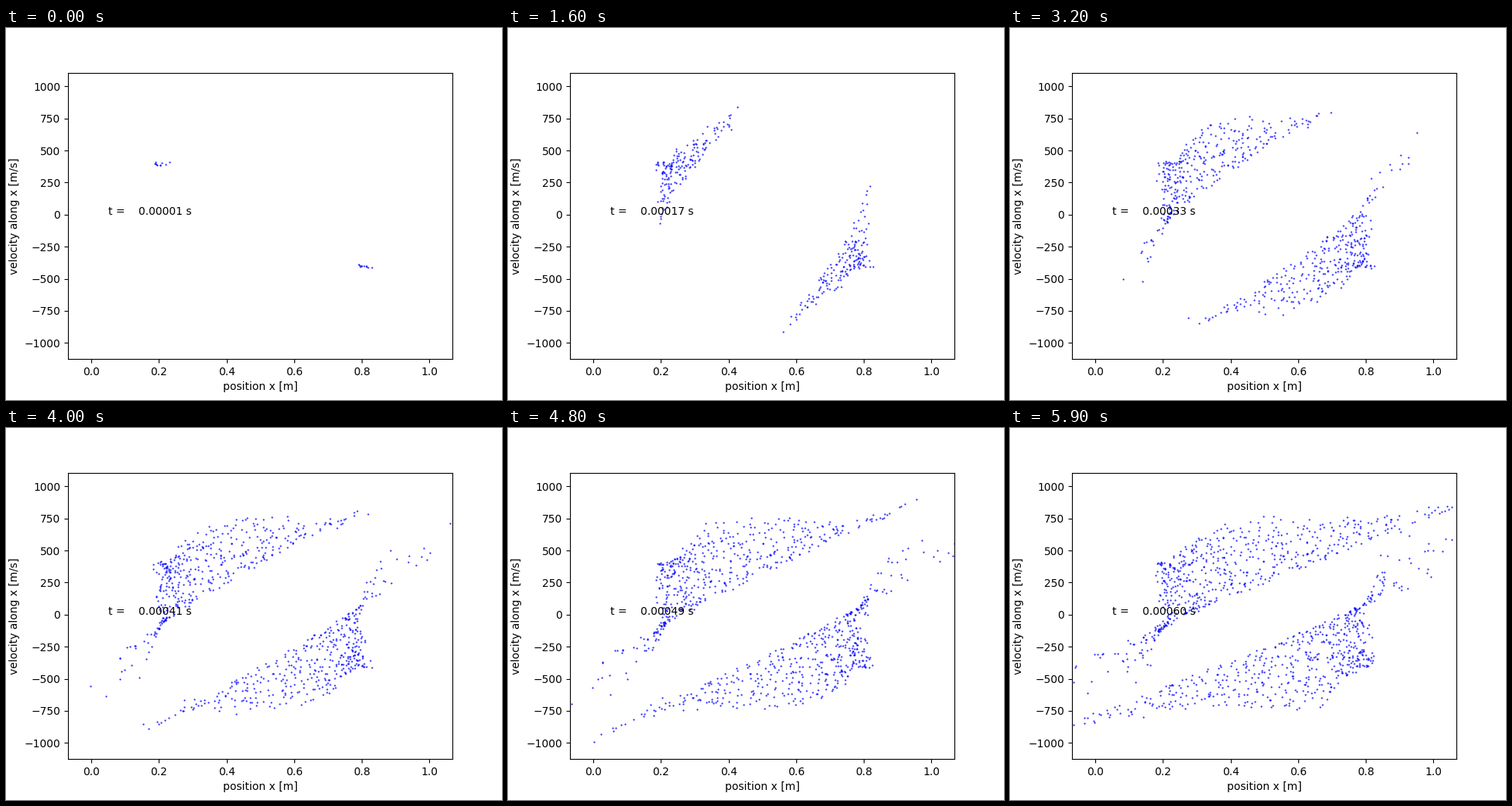
Write a matplotlib script that moves like this. It is 640 px wide and 480 px high and loops after 6 s.

```python
import numpy as np
import matplotlib.pyplot as plt
from matplotlib.animation import FuncAnimation

FRAMES = 60
BATCH = 10           # particles injected per beam and frame
STEP = 2e-5          # distance moved per frame and unit of speed
SPEED = 400
SOURCE = .2          # the second source mirrors this one
WIDTH = .014         # spread of a new batch in every direction
HEAT = 10            # spread of its speed
SOFT = .01           # softens the force between close pairs
MEET, MEET_SPEED = 25, 650   # frame and speed of the fronts when they meet


def new_batch(rng):
    """Two clouds of particles that fly towards each other along x."""
    pos = rng.normal(0, WIDTH, (2 * BATCH, 3))
    vel = rng.normal(0, HEAT, (2 * BATCH, 3))
    side = np.repeat([-1, 1], BATCH)
    pos[:, 0] += .5 + side * (.5 - SOURCE)
    vel[:, 0] -= side * SPEED
    return pos, vel


def repulsion(pos):
    """Sum of softened inverse-square forces on every particle."""
    p = pos - pos.mean(axis=0)
    square = (p ** 2).sum(axis=1)
    dist2 = square[:, None] + square - 2 * p @ p.T + SOFT ** 2
    weight = 1 / (dist2 * np.sqrt(dist2))
    return p * weight.sum(axis=1)[:, None] - weight @ p


def simulate(strength, frames):
    """Return positions and speeds along x for every frame."""
    rng = np.random.default_rng(4)
    pos, vel = np.empty((0, 3)), np.empty((0, 3))
    states = []
    for _ in range(frames):
        new_pos, new_vel = new_batch(rng)
        pos = np.vstack([pos, new_pos])
        vel = np.vstack([vel, new_vel])
        states.append((pos[:, 0].copy(), vel[:, 0].copy()))
        vel += strength * repulsion(pos)
        pos += STEP * vel
    return states


def find_strength():
    """Bisect for the repulsion that gives the fronts their meeting speed."""
    low, high = 0, 2e-3
    for _ in range(12):
        mid = (low + high) / 2
        front = simulate(mid, MEET)[-1][1][:2 * BATCH]
        if np.abs(front).mean() < MEET_SPEED:
            low = mid
        else:
            high = mid
    return mid


states = simulate(find_strength(), FRAMES)

fig, ax = plt.subplots(figsize=(6.4, 4.8), dpi=100)
ax.set_xlim(-.069, 1.068)
ax.set_ylim(-1126, 1107)
ax.set_xlabel("position x [m]")
ax.set_ylabel("velocity along x [m/s]")
dots, = ax.plot([], [], "b.", markersize=1)
clock = ax.text(.05, 0, "")


def update(i):
    dots.set_data(*states[i])
    clock.set_text(f"t = {(i + 1) * 1e-5:10.5f} s")
    return dots, clock


anim = FuncAnimation(fig, update, frames=FRAMES, interval=100,
                     init_func=lambda: update(0), repeat=True)
plt.show()
```
